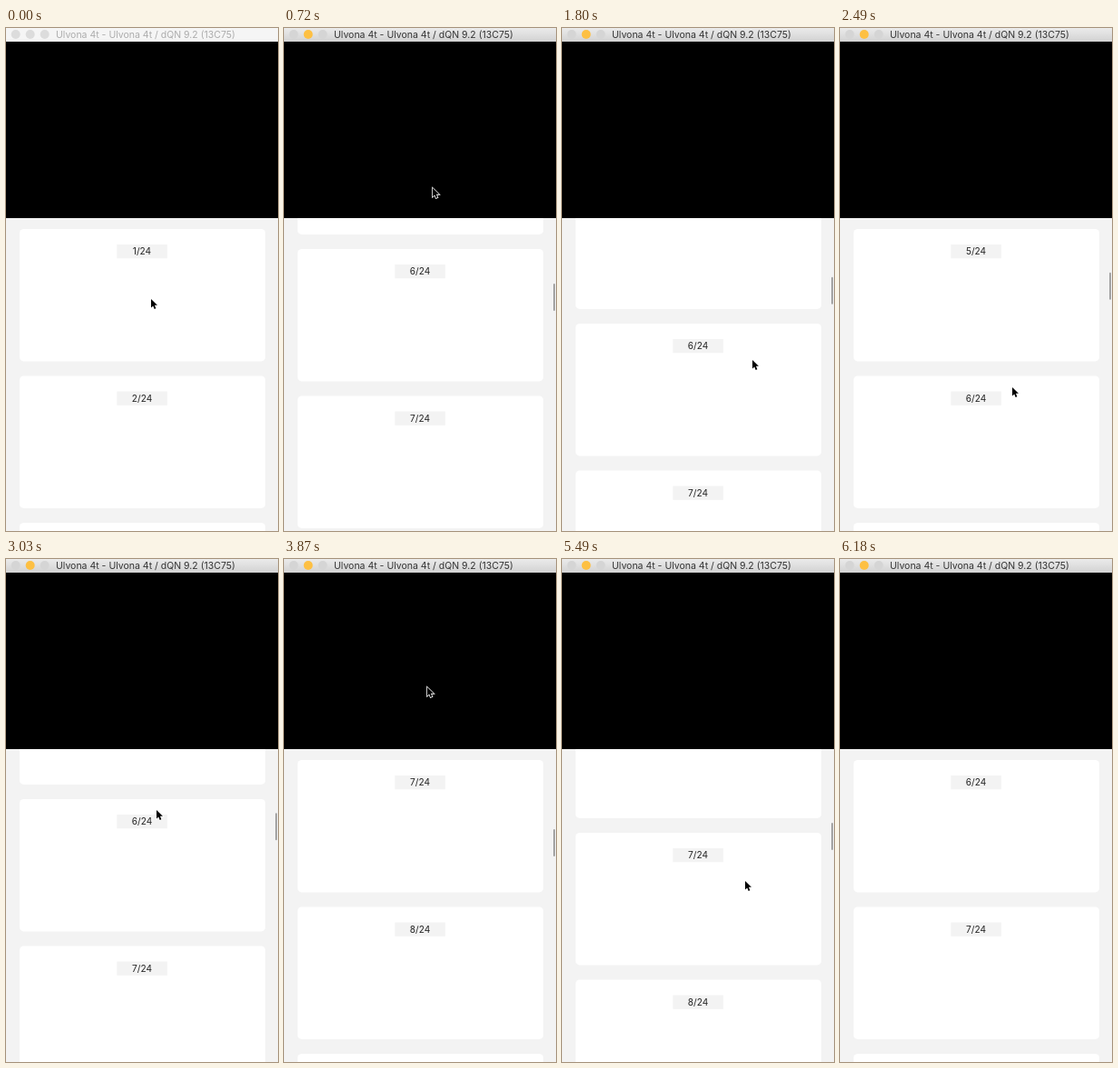
Write an HTML page that moves like this. It is 300 by 553 pixels and loops after 6.27 s.

```html
<!DOCTYPE html>
<html lang="en">
<head>
<meta charset="utf-8">
<title>Paged list</title>
<style>
html, body { margin: 0; width: 100%; height: 100%; overflow: hidden; background: #f3f3f3; }
svg { display: block; width: 300px; height: 553px; }
text { font-family: Inter, Roboto, sans-serif; }
.label { font-size: 10.1px; fill: #222; text-anchor: middle; }
.title { font-size: 10.5px; }
</style>
</head>
<body>
<svg viewBox="0 0 300 553">
  <defs>
    <linearGradient id="chrome" x2="0" y2="1">
      <stop stop-color="#ebebeb"/><stop offset="1" stop-color="#d2d2d2"/>
    </linearGradient>
    <clipPath id="view"><rect y="209" width="300" height="344"/></clipPath>
  </defs>
  <rect width="300" height="553" fill="#f3f3f3"/>
  <g clip-path="url(#view)"><g id="list"></g></g>
  <rect id="thumb" x="297" width="2" height="30" rx="1" fill="#a3a3a3"/>
  <rect y="15" width="300" height="194"/>
  <rect id="bar" width="300" height="15"/>
  <g id="dots">
    <circle cx="10.7" cy="7" r="5"/><circle cx="26.7" cy="7" r="5"/><circle cx="42.7" cy="7" r="5"/>
  </g>
  <text id="title" class="title" x="55" y="11">Ulvona 4t - Ulvona 4t / dQN 9.2 (13C75)</text>
  <g id="cursor">
    <path transform="scale(.87)" d="M0 0V11L2.6 8.6 4.2 12.6 6.2 11.8 4.5 7.9H8Z" stroke="#fff" stroke-width="1.8" paint-order="stroke"/>
  </g>
</svg>
<script>
const LOOP = 6270, STEP = 30, PITCH = 161.5, COUNT = 24;
const ACTIVE_AT = 150, SCROLL_AT = 210, FADE_END = 6120, FADE = 180;
const $ = id => document.getElementById(id);

const drag = u => u * u * (3 - 2 * u);
const flick = u => 1 - (1 - u) ** 3;

// The list moves between whole pages, with one held part-way
const pages = [
  { from: SCROLL_AT, to: 940, page: 5, ease: flick },
  { from: 1230, to: 2185, page: 4, ease: drag },
  { from: 2490, to: 3155, page: 4.81, ease: drag },
  { from: 3390, to: 3870, page: 6, ease: drag },
  { from: 4260, to: 4934, page: 8, ease: drag },
  { from: 4955, to: 6150, page: 5, ease: flick }
];

// The hand follows each drag, then glides to the next grip
const hand = [
  { from: SCROLL_AT, to: 700, x: 164, y: 176 },
  { from: 940, to: 1230, x: 196, y: 261 },
  { from: 1230, to: 2185, x: 218, y: 422 },
  { from: 2200, to: 2490, x: 190, y: 395 },
  { from: 2490, to: 3155, x: 164, y: 264 },
  { from: 3390, to: 3870, x: 158, y: 141 },
  { from: 4020, to: 4110, x: 156, y: 452 },
  { from: 4260, to: 4934, x: 157, y: 129 },
  { from: 4955, to: 5994, x: 243, y: 560 }
];

const clamp = v => Math.max(0, Math.min(1, v));

function follow(moves, key, start, t) {
  return moves.reduce((value, m) => {
    const ease = m.ease || drag;
    return value + (m[key] - value) * ease(clamp((t - m.from) / (m.to - m.from)));
  }, start);
}

$('list').innerHTML = Array.from({ length: COUNT }, (_, i) => `
  <g transform="translate(0 ${221 + i * PITCH})">
    <rect x="15" width="271" height="145.4" rx="4.5" fill="#fff"/>
    <rect x="122.3" y="17" width="55.5" height="15.3" fill="#f3f3f3"/>
    <text class="label" x="150" y="28.2">${i + 1}/${COUNT}</text>
  </g>`).join('');

function paintChrome(active) {
  $('bar').setAttribute('fill', active ? 'url(#chrome)' : '#f5f5f5');
  $('title').setAttribute('fill', active ? '#333' : '#acacac');
  [...$('dots').children].forEach((dot, i) =>
    dot.setAttribute('fill', !active ? '#dcdcdc' : i === 1 ? '#fdc043' : '#d5d5d5'));
}

function draw(t) {
  const offset = follow(pages, 'page', 0, t) * PITCH;
  $('list').setAttribute('transform', `translate(0 ${-Math.round(offset * 2) / 2})`);
  $('thumb').setAttribute('y', 212 + offset * 0.0878);
  $('thumb').style.opacity = t > SCROLL_AT ? clamp((FADE_END - t) / FADE) : 0;
  const x = Math.round(follow(hand, 'x', 160, t));
  const y = Math.round(follow(hand, 'y', 298, t));
  $('cursor').setAttribute('transform', `translate(${x} ${y})`);
  paintChrome(t >= ACTIVE_AT);
}

const start = performance.now();
function tick() {
  const t = (performance.now() - start) % LOOP;
  draw(Math.floor(t / STEP) * STEP);
  requestAnimationFrame(tick);
}
draw(0);
requestAnimationFrame(tick);
</script>
</body>
</html>
```
